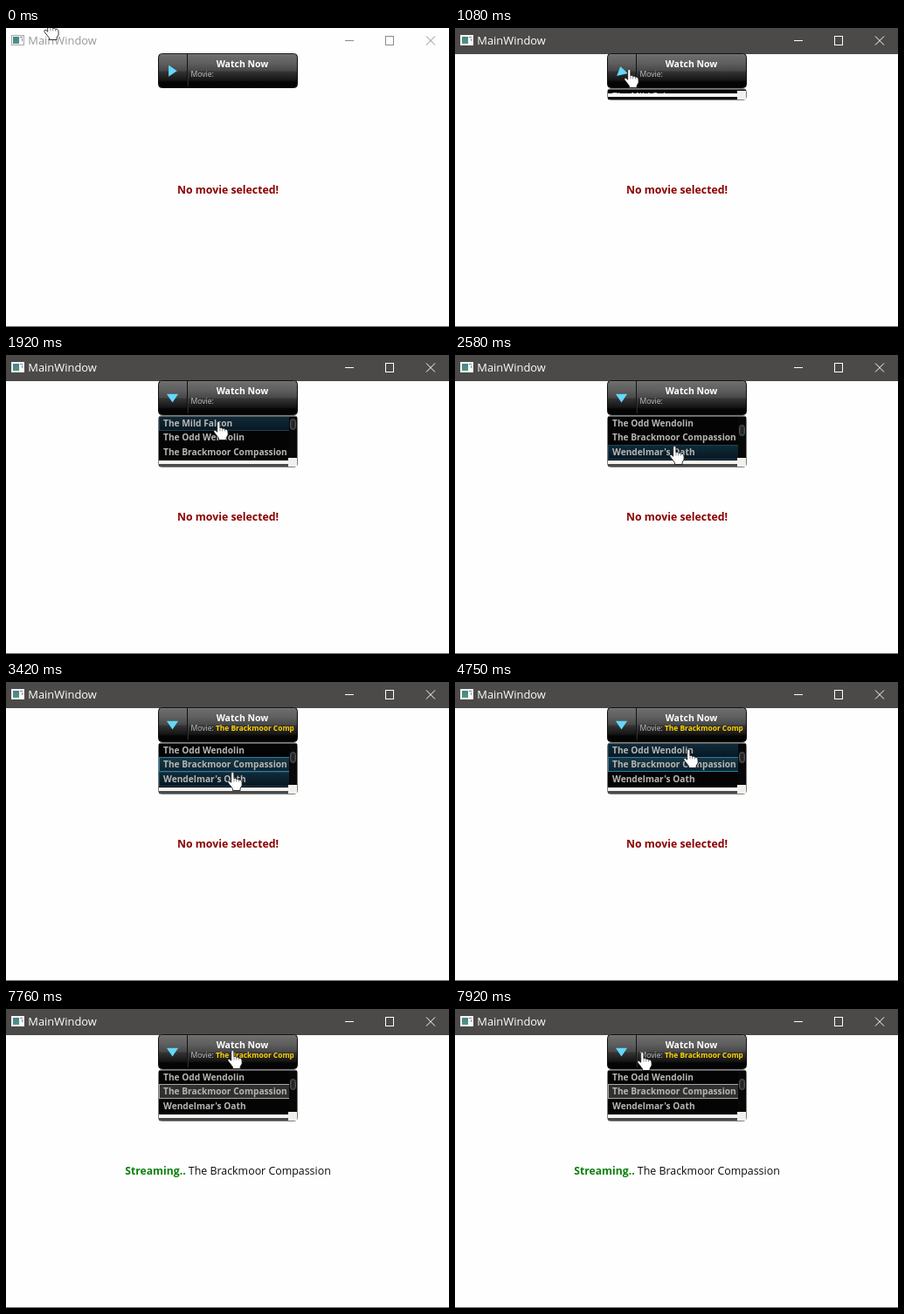
Animation, 507 px wide and 343 px high, one loop 8 s. Source, as an HTML page with a canvas:

```html
<!DOCTYPE html>
<html lang="en">
<head>
<meta charset="utf-8">
<title>MainWindow</title>
<style>
  html, body { margin: 0; width: 100%; height: 100%; overflow: hidden; background: #fefefe; }
  canvas { display: block; }
</style>
</head>
<body>
<canvas id="stage" width="507" height="343"></canvas>
<script>
const ctx = document.getElementById('stage').getContext('2d');
const LOOP = 8000;
const STEP = 1000 / 12;
const FONT = '"Open Sans", "Noto Sans", sans-serif';
const MOVIES = ['The Mild Falcon', 'The Odd Wendolin', 'The Brackmoor Compassion', "Wendelmar's Oath"];
const CHOICE = 2;
const ROW = 16.6;
const LIST_TOP = 69.6;
const POPUP = { top: 69, closed: 13, open: 60 };

// Moments in ms at which the interface changes state
const AT = { activate: 660, open: 1080, scroll: 2580, select: 3170, blur: 5340, stream: 5500 };

// Pointer tip: time, x, y
const PATH = [
  [0, 50, -8], [660, 200, 47], [1080, 200, 47], [1330, 200, 47], [1920, 244, 76], [2420, 252, 104],
  [2670, 252, 104], [2920, 256, 98], [3250, 256, 98], [3420, 260, 103], [3670, 262, 108],
  [3920, 262, 108], [4170, 264, 104], [4340, 264, 104], [4750, 268, 77], [5170, 278, 48],
  [5340, 279, 46], [7680, 279, 46], [7920, 214, 49]
];

const HAND = new Path2D('M4 1.6q1.6-2.8 3.2 0V7.6q1.6-1 2.8.8 1.6-.9 2.8.8 1.8-.6 2.9 1.2q.8 1 .7 3.2' +
  'v2.2L14.4 19.2v2.3H5.8v-2L.6 12.8q-1.2-2 .4-2.6 1-.3 3 2z');

const clamp = v => Math.max(0, Math.min(1, v));
const easeOut = v => 1 - (1 - clamp(v)) ** 2;

function pointerAt(t) {
  const next = PATH.findIndex(p => p[0] > t);
  if (next < 0) return PATH[PATH.length - 1].slice(1);
  const [t0, x0, y0] = PATH[next - 1], [t1, x1, y1] = PATH[next];
  const k = (t - t0) / (t1 - t0);
  return [Math.round(x0 + (x1 - x0) * k), Math.round(y0 + (y1 - y0) * k)];
}

function rect(x, y, w, h, fill) {
  ctx.fillStyle = fill;
  ctx.fillRect(x, y, w, h);
}

function frame(x, y, w, h, color) {
  ctx.strokeStyle = color;
  ctx.lineWidth = 1;
  ctx.strokeRect(x + .5, y + .5, w - 1, h - 1);
}

function rounded(x, y, w, h, r, fill, stroke) {
  ctx.beginPath();
  ctx.roundRect(x + .5, y + .5, w - 1, h - 1, r);
  ctx.fillStyle = fill;
  ctx.fill();
  ctx.strokeStyle = stroke;
  ctx.lineWidth = 1;
  ctx.stroke();
}

function vertical(y0, y1, ...stops) {
  const g = ctx.createLinearGradient(0, y0, 0, y1);
  stops.forEach(([at, color]) => g.addColorStop(at, color));
  return g;
}

function text(str, x, y, size, color, weight = 400) {
  ctx.font = `${weight} ${size}px ${FONT}`;
  ctx.fillStyle = color;
  ctx.fillText(str, x, y);
  return ctx.measureText(str).width;
}

function width(str, size, weight = 400) {
  ctx.font = `${weight} ${size}px ${FONT}`;
  return ctx.measureText(str).width;
}

function clipped(x, y, w, h, draw) {
  ctx.save();
  ctx.beginPath();
  ctx.rect(x, y, w, h);
  ctx.clip();
  draw();
  ctx.restore();
}

function drawWindow(active) {
  rect(0, 0, 507, 343, '#fefefe');
  rect(0, 342, 507, 1, '#6b6b6b');
  if (active) rect(0, 0, 507, 30, '#4c4a48');

  rect(6, 8, 15, 12, active ? '#f4f4f4' : '#a8a8a8');
  rect(7, 9, 13, 10, '#f8f8f8');
  rect(8, 10, 7, 8, vertical(10, 18, [0, '#4d7f96'], [1, '#4f9878']));
  rect(16, 10, 3, 1, '#6d8796');
  rect(18, 12, 1, 3, '#8b9297');

  text('MainWindow', 25.3, 19, 12.9, active ? '#ffffff' : '#999999');

  const ink = active ? '#ffffff' : '#8c8c8c';
  rect(388, 14, 10, 1, ink);
  frame(434, 9, 10, 11, ink);
  ctx.beginPath();
  ctx.moveTo(481, 9.5); ctx.lineTo(491, 19.5);
  ctx.moveTo(491, 9.5); ctx.lineTo(481, 19.5);
  ctx.stroke();
}

function drawArrow(angle) {
  ctx.save();
  ctx.translate(190.5, 49.2);
  ctx.rotate(angle);
  ctx.beginPath();
  ctx.moveTo(-4.4, -6.6);
  ctx.lineTo(5.2, 0);
  ctx.lineTo(-4.4, 6.6);
  ctx.closePath();
  ctx.fillStyle = '#62d8fa';
  ctx.fill();
  ctx.restore();
}

function drawButton(t) {
  rounded(174, 29, 160, 40, 4,
    vertical(30, 68, [0, '#6e6e6e'], [.26, '#606060'], [.5, '#484848'], [.53, '#343434'], [.78, '#161616'], [.84, '#050505'], [1, '#030303']),
    '#101010');
  rect(177, 30, 154, 1, '#787878');
  rect(207, 30, 1, 37, '#121212');
  rect(208, 30, 1, 37, vertical(30, 67, [0, '#747474'], [1, '#202020']));

  drawArrow(-Math.PI * 1.5 * clamp((t - AT.open + 85) / 230));
  text('Watch Now', 270.5 - width('Watch Now', 10.5, 700) / 2, 45, 10.5, '#ffffff', 700);
  text('Movie:', 211.5, 56, 8.6, '#c4c4c4');
  if (t >= AT.select) {
    clipped(209, 46, 120.5, 16, () => text(MOVIES[CHOICE], 240, 56, 8.4, '#ffd400', 700));
  }
}

function drawRow(index, y, hovered, selected, focused) {
  const h = 17, x = 175, w = 160;
  if (selected) {
    rect(x, y, w, h, focused ? vertical(y, y + h, [0, '#183844'], [1, '#0c2430']) : '#30302f');
    frame(x, y, w, h, focused ? '#2b7dab' : '#a9a9a2');
  } else if (hovered) {
    rect(x, y, w, h, vertical(y, y + h, [0, '#102c3a'], [1, '#071722']));
    frame(x, y, w, h, '#1c4257');
  }
  text(MOVIES[index], 180, y + 12, 10.2, '#b6b6b4', 700);
}

function drawScrollBar(thumbTop) {
  rect(324, 70, 9, 51, '#080808');
  rounded(325, thumbTop, 7, 13, 3, '#2c2f2e', '#545857');
  rect(328, thumbTop + 3, 1, 7, '#151515');
}

function drawPopup(t, pointer) {
  if (t < AT.open) return;
  const { top, closed, open } = POPUP;
  const h = Math.round(closed + (open - closed) * easeOut((t - AT.open) / 420));
  const bottom = top + h;
  const offset = t >= AT.scroll ? 1 : 0;
  const inside = h === open && pointer[1] > LIST_TOP && pointer[1] < 121;
  const hover = inside ? Math.floor((pointer[1] - LIST_TOP + .4) / ROW) : -1;

  rounded(174, top, 160, h, 4, '#5c5c5c', '#7d7d7d');
  rect(175, top + 2, 158, h - 4, '#040404');

  clipped(175, top + 2, 158, Math.max(0, h - 10), () => {
    clipped(175, top + 2, 149, h, () => {
      for (let i = 0; i < 3; i++) {
        const index = i + offset;
        const selected = index === CHOICE && t >= AT.select;
        drawRow(index, Math.round(LIST_TOP + i * ROW), i === hover, selected, t < AT.blur);
      }
    });
    drawScrollBar(73 + offset * 7);
  });

  rect(175, bottom - 8, 148, 4, '#f6f6f3');
  rect(175, bottom - 4, 148, 3, h < 20 ? '#111111' : '#4a4a4a');
  rect(323, bottom - 11, 10, 10, '#f0f0ec');
}

function drawStatus(t) {
  const y = 190;
  if (t < AT.stream) {
    const msg = 'No movie selected!';
    text(msg, 254 - width(msg, 12.3, 700) / 2, y, 12.3, '#8b0000', 700);
    return;
  }
  const label = 'Streaming..', title = ' ' + MOVIES[CHOICE];
  const x = 254 - (width(label, 12.2, 700) + width(title, 12.4)) / 2;
  const used = text(label, x, y, 12.2, '#0b800b', 700);
  text(title, x + used, y, 12.4, '#0a0a0a');
}

function drawPointer([x, y]) {
  ctx.save();
  ctx.translate(x - 6.3, y);
  ctx.fillStyle = '#ffffff';
  ctx.fill(HAND);
  ctx.strokeStyle = '#1a1a1a';
  ctx.lineWidth = .9;
  ctx.lineJoin = 'round';
  ctx.stroke(HAND);
  ctx.beginPath();
  [7.3, 10, 12.8].forEach((dx, i) => {
    ctx.moveTo(dx, 8 + i * .8);
    ctx.lineTo(dx, 11.5);
  });
  ctx.lineWidth = .5;
  ctx.stroke();
  ctx.restore();
}

function render(now) {
  const t = Math.floor((now % LOOP + 7) / STEP) * STEP % LOOP;
  const pointer = pointerAt(t);
  drawWindow(t >= AT.activate);
  drawButton(t);
  drawPopup(t, pointer);
  drawStatus(t);
  drawPointer(pointer);
}

const start = performance.now();
function tick() {
  render(performance.now() - start);
  requestAnimationFrame(tick);
}
tick();
</script>
</body>
</html>
```
